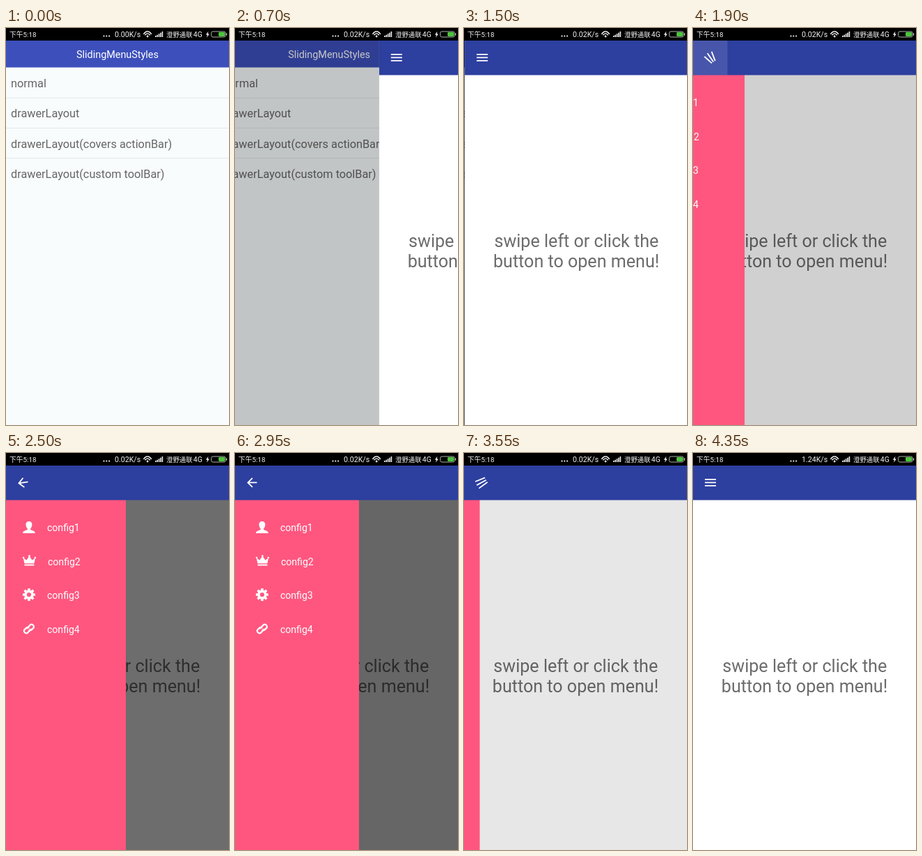
An HTML page that plays this animation: 320 px wide and 569 px high, repeating every 4400 ms.

```html
<!DOCTYPE html>
<html lang="en">
<head>
<meta charset="utf-8">
<title>Sliding menu</title>
<style>
  html, body { margin: 0; width: 100%; height: 100%; overflow: hidden; background: #000; }
  svg { display: block; width: 100vw; height: 100vh; }
  text { font-family: Roboto, "Noto Sans CJK SC", "Noto Sans CJK", sans-serif; white-space: pre; }
  .status { fill: #f2f2f2; font-size: 10.6px; }
  .title { fill: #fff; font-size: 14.4px; text-anchor: middle; }
  .row { fill: #666; font-size: 16.3px; }
  .hint { fill: #6c6c6c; font-size: 25.1px; text-anchor: middle; }
  .item { fill: #fff; font-size: 14.1px; }
  .line { fill: none; stroke: #fff; }
</style>
</head>
<body>
<svg viewBox="0 0 320 569" preserveAspectRatio="none">
  <clipPath id="pageArea"><rect y="18" width="320" height="551"/></clipPath>

  <g id="list">
    <rect y="18" width="320" height="551" fill="#f8fcfc"/>
    <rect y="18" width="320" height="38.5" fill="#3c4fbb"/>
    <text class="title" x="160" y="43">SlidingMenuStyles</text>
    <g id="rows"></g>
  </g>
  <rect id="dim" y="18" width="320" height="551"/>

  <g id="page" clip-path="url(#pageArea)">
    <rect y="18" width="320" height="551" fill="#fff"/>
    <text class="hint" x="160.3" y="313.6">swipe left or click the</text>
    <text class="hint" x="160" y="342.8">button to open menu!</text>
    <rect id="scrim" y="67" width="320" height="502"/>
    <g id="drawer">
      <rect y="67" width="178" height="502" fill="#ff567f"/>
      <g fill="#fff">
        <g transform="translate(39 106.5)">
          <path d="M0-8.5C3-8.5 4.6-6.4 4.4-3.4 4.2-.8 3.2 1 2.2 2V3.4C5 4.6 8.8 5.2 9 8.5H-9C-8.8 5.2-5 4.6-2.2 3.4V2C-3.2 1-4.2-.8-4.4-3.4-4.6-6.4-3-8.5 0-8.5Z"/>
        </g>
        <g transform="translate(39.5 154)">
          <path d="M-7 4.2L-8.6-3.6-4-.4 0-6.4 4-.4 8.6-3.6 7 4.2ZM-7 5.6H7V7.4H-7Z"/>
          <circle cx="-8.4" cy="-4" r="1.3"/><circle cy="-6.4" r="1.4"/><circle cx="8.4" cy="-4" r="1.3"/>
        </g>
        <g id="gear" transform="translate(39 203)">
          <circle class="line" r="4.9" stroke-width="3.6"/>
        </g>
        <g class="line" transform="translate(39 252) rotate(-45)" stroke-width="2.3" stroke-linecap="round">
          <path d="M1.6 2.6H-6A3.4 3.4 0 0 1-6-3.6H-2A3.2 3.2 0 0 1 .8-1.6"/>
          <path d="M-1.6-2.6H6A3.4 3.4 0 0 1 6 3.6H2A3.2 3.2 0 0 1-.8 1.6"/>
        </g>
      </g>
      <g id="items"></g>
    </g>
    <rect y="18" width="320" height="49.5" fill="#2d3f9f"/>
    <rect id="press" y="18" width="49.5" height="49.5" fill="#fff"/>
    <path id="arrow" class="line" stroke-width="1.8"/>
  </g>

  <g>
    <rect width="320" height="18"/>
    <text class="status" x="5" y="13" style="font-size:9.8px">下午5:18</text>
    <g fill="#f2f2f2">
      <circle cx="140.5" cy="11.6" r="1.1"/><circle cx="144.3" cy="11.6" r="1.1"/><circle cx="148.1" cy="11.6" r="1.1"/>
    </g>
    <text class="status" id="speed" x="156" y="13"></text>
    <g class="line" stroke-width="1.4">
      <path d="M197.4 8.8Q203 1 208.8 8.8"/>
      <path d="M199.4 10.2Q203.1 5.6 206.8 10.2"/>
      <circle cx="203.1" cy="12" r=".7" fill="#fff"/>
    </g>
    <path d="M214 11h1.6v2h-1.6zM216.4 9.8h1.6v3.2h-1.6zM218.8 8.3h1.6v4.7h-1.6zM221.2 6.7h1.6v6.3h-1.6zM223.6 5h1.6v8h-1.6z" fill="#f2f2f2"/>
    <text class="status" x="230" y="12.7" style="font-size:9.4px">澄野通联</text>
    <text class="status" x="268.8" y="13" style="font-size:10.4px">4G</text>
    <path d="M290.4 4.8L286.8 9.8H289L288 13.8 291.8 8.4H289.6Z" fill="#f2f2f2"/>
    <rect class="line" x="294.5" y="5" width="20.5" height="8" rx="2.4" stroke-width="1" style="stroke:#a9b5a6"/>
    <rect x="305" y="6" width="9" height="6" rx="1.4" fill="#4cc43c"/>
    <rect x="315.6" y="7.3" width="1.6" height="3.4" rx=".6" fill="#a9b5a6"/>
  </g>
</svg>
<script>
const LOOP = 4400, STEP = 50;
const WIDTH = 320, DRAWER = 178;
const SLIDE = { start: 548, length: 1122 };
const SETTLE = 1540, OPEN = 1743, CLOSE = 3029;
const LAG = 48;   // scrim and icon trail the drawer slightly
const DP = 8 / 9;

const $ = id => document.getElementById(id);
const clamp = v => Math.min(1, Math.max(0, v));
const lerp = (a, b, p) => a + (b - a) * p;
const easeOut = (u, power) => 1 - (1 - clamp(u)) ** power;
const shift = (id, x) => $(id).setAttribute('transform', `translate(${x.toFixed(2)} 0)`);

function add(parent, tag, attrs, content = '') {
  const el = document.createElementNS('http://www.w3.org/2000/svg', tag);
  for (const key in attrs) el.setAttribute(key, attrs[key]);
  el.textContent = content;
  $(parent).append(el);
}

['normal', 'drawerLayout', 'drawerLayout(covers actionBar)', 'drawerLayout(custom toolBar)']
  .forEach((label, i) => {
    add('rows', 'text', { class: 'row', x: 7, y: 84.9 + 43.3 * i }, label);
    if (i < 3) add('rows', 'rect', { y: 99.7 + 43.2 * i, width: WIDTH, height: 1, fill: '#e2e9ea' });
  });

for (let i = 0; i < 4; i++)
  add('items', 'text', { class: 'item', x: i === 1 ? 66 : 65, y: 112 + 48.7 * i }, 'config' + (i + 1));

for (let i = 0; i < 8; i++)
  add('gear', 'rect', { x: -1.8, y: -9, width: 3.6, height: 3.5, rx: .6, transform: `rotate(${45 * i})` });

function drawerAt(t) {
  return t < CLOSE ? easeOut((t - OPEN) / SETTLE, 5) : 1 - easeOut((t - CLOSE) / SETTLE, 5);
}

// Three bars that spin and fold into a back arrow.
function drawArrow(p, mirrored) {
  const cut = DP * Math.SQRT1_2;
  const head = lerp(18, 8 * Math.SQRT2, p) * DP;
  const shaft = lerp(18, 16, p) * DP;
  const tilt = lerp(0, Math.PI / 4, p);
  const w = head * Math.cos(tilt), h = head * Math.sin(tilt);
  const gap = lerp(5 * DP, -cut, p);
  const edge = -shaft / 2, inset = cut * p;
  $('arrow').setAttribute('d',
    `M${edge + inset} 0h${shaft - 2 * inset}M${edge} ${gap}l${w} ${h}M${edge} ${-gap}l${w} ${-h}`);
  const spin = lerp(-180, 0, p) * (mirrored ? -1 : 1);
  $('arrow').setAttribute('transform', `translate(25 42.4) rotate(${spin})`);
}

function draw(t) {
  const moved = easeOut((t - SLIDE.start) / SLIDE.length, 3);
  shift('page', WIDTH * (1 - moved));
  shift('list', -.22 * WIDTH * moved);
  $('dim').setAttribute('opacity', .62 * moved);

  const late = drawerAt(t - LAG);
  shift('drawer', DRAWER * (drawerAt(t) - 1));
  $('scrim').setAttribute('opacity', .6 * late);
  drawArrow(late, t - LAG >= CLOSE);

  const press = Math.min(clamp((t - 1650) / 100), clamp((2200 - t) / 300));
  $('press').setAttribute('opacity', .12 * press);
  $('speed').textContent = t < 300 ? '0.00K/s' : t < 4200 ? '0.02K/s' : '1.24K/s';
}

const begin = performance.now();
function tick() {
  const t = (performance.now() - begin) % LOOP;
  draw(Math.floor(t / STEP) * STEP);
  requestAnimationFrame(tick);
}
tick();
</script>
</body>
</html>
```
